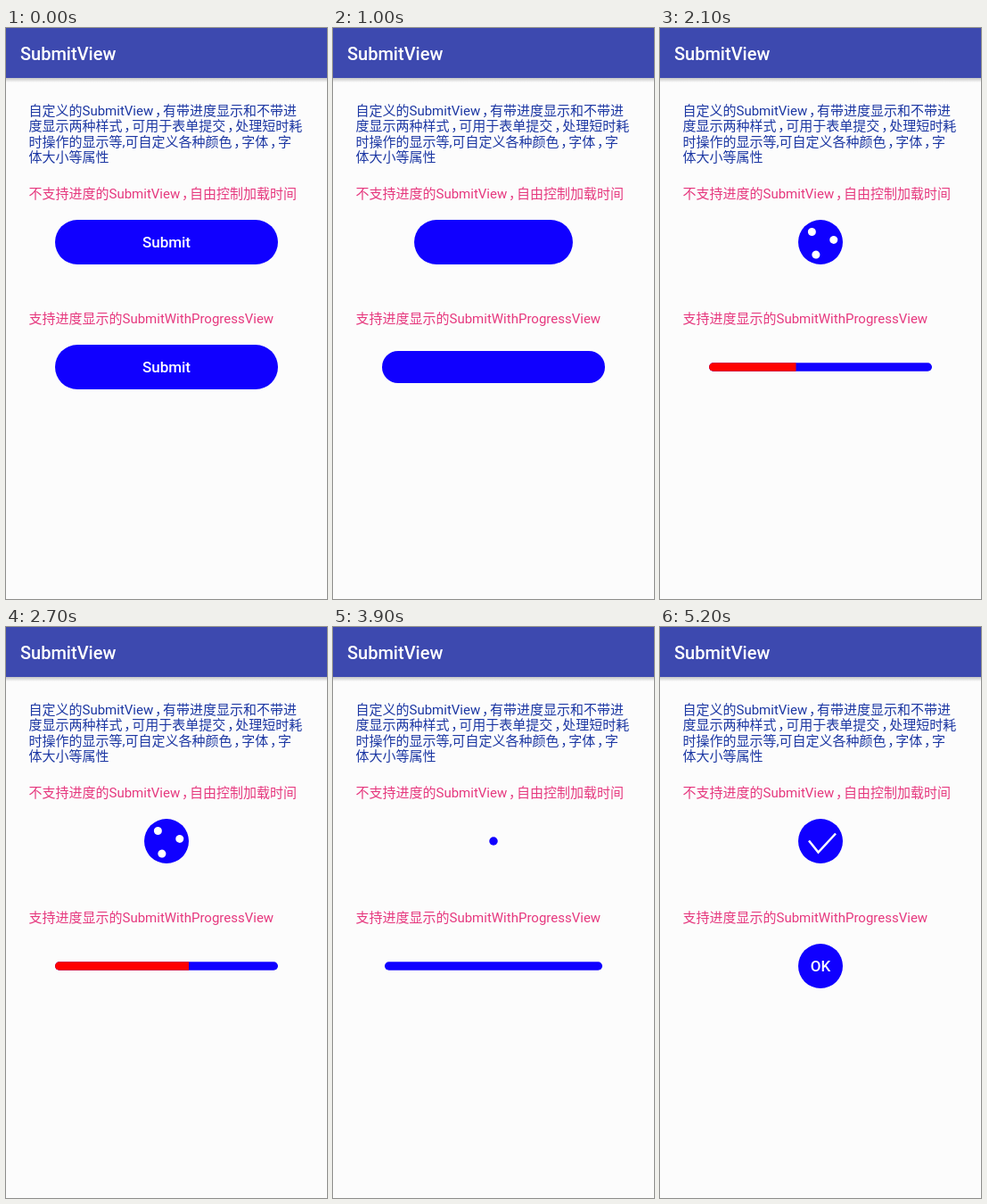
An HTML page that plays this animation: 360 by 640 pixels, repeating every 5.3 s.

```html
<!DOCTYPE html>
<html lang="zh-CN">
<head>
<meta charset="utf-8">
<title>SubmitView</title>
<style>
html, body { margin: 0; width: 100%; height: 100%; overflow: hidden; background: #fcfcfc; }
svg { display: block; width: 100%; height: 100%; }
text { font-family: Roboto, "Noto Sans CJK SC", "Noto Sans CJK", sans-serif; font-size: 15px; }
.title { font-size: 20px; font-weight: 500; fill: #fff; }
.label { font-size: 17px; font-weight: 500; fill: #fff; text-anchor: middle; }
.intro { fill: #1c37a3; }
.note { fill: #e6387e; }
.fill { fill: #1000ff; }
</style>
</head>
<body>
<svg viewBox="0 0 360 640">
  <defs>
    <linearGradient id="shade" x1="0" y1="0" x2="0" y2="1">
      <stop offset="0" stop-color="#000" stop-opacity=".22"/>
      <stop offset="1" stop-color="#000" stop-opacity="0"/>
    </linearGradient>
    <clipPath id="barClip"><rect id="clipRect"/></clipPath>
  </defs>
  <rect width="360" height="640" fill="#fcfcfc"/>
  <rect width="360" height="56" fill="#3d49af"/>
  <rect y="56" width="360" height="5" fill="url(#shade)"/>
  <text class="title" x="16" y="36">SubmitView</text>
  <g id="copy"></g>

  <rect id="top" class="fill"/>
  <text id="topLabel" class="label" x="180" y="246">Submit</text>
  <g id="dots" fill="#fff">
    <circle cx="15" r="4.5"/>
    <circle cx="15" r="4.5" transform="rotate(120)"/>
    <circle cx="15" r="4.5" transform="rotate(240)"/>
  </g>
  <path id="tick" d="M167 239.5L177.500 252.500L197 231.500" fill="none" stroke="#fff" stroke-width="2.5"/>

  <rect id="bar" class="fill"/>
  <rect id="done" x="55" y="355" height="50" fill="#f00" clip-path="url(#barClip)"/>
  <text id="barLabel" class="label" x="180" y="386">Submit</text>
</svg>
<script>
const NS = 'http://www.w3.org/2000/svg';
const LOOP = 5300, STEP = 100;
const WIDE = 250, TALL = 50, THIN = 9.5;
const $ = id => document.getElementById(id);

// Full-width commas sit in a narrower cell than the other glyphs.
function addLine(cls, y, str) {
  const line = document.createElementNS(NS, 'text');
  line.setAttribute('class', cls);
  line.setAttribute('x', 25.5);
  line.setAttribute('y', y);
  const span = (s, dx) => {
    const el = document.createElementNS(NS, 'tspan');
    el.textContent = s;
    el.setAttribute('dx', dx);
    line.append(el);
  };
  str.split('，').forEach((part, i) => {
    if (i) span('，', 1.8);
    span(part, i ? -6 : 0);
  });
  $('copy').append(line);
}

addLine('intro', 97.5, '自定义的SubmitView，有带进度显示和不带进');
addLine('intro', 115, '度显示两种样式，可用于表单提交，处理短时耗');
addLine('intro', 132.5, '时操作的显示等,可自定义各种颜色，字体，字');
addLine('intro', 150, '体大小等属性');
addLine('note', 190.5, '不支持进度的SubmitView，自由控制加载时间');
addLine('note', 330.5, '支持进度显示的SubmitWithProgressView');

const clamp = x => Math.min(1, Math.max(0, x));

// Eased 0..1 between two times
const ramp = (t, from, to) => (1 - Math.cos(Math.PI * clamp((t - from) / (to - from)))) / 2;

function pill(el, cy, w, h) {
  const box = { x: 180 - w / 2, y: cy - h / 2, width: w, height: h, rx: Math.min(w, h) / 2 };
  for (const key in box) el.setAttribute(key, box[key]);
}

const show = (el, on) => el.setAttribute('visibility', on ? 'visible' : 'hidden');

function drawTop(t) {
  const pulse = (TALL - THIN) * (ramp(t, 3300, 3800) - ramp(t, 3900, 4300));
  const w = WIDE - (WIDE - TALL) * ramp(t, 795, 1295);
  pill($('top'), 240, w - pulse, TALL - pulse);
  show($('topLabel'), t < 800);
  show($('dots'), t >= 1300 && t < 3300);
  $('dots').setAttribute('transform', `translate(180 240) rotate(${270 + (t - 1300) * 0.4})`);
  show($('tick'), t >= 4300);
}

function drawBar(t) {
  const grow = (TALL - THIN) * ramp(t, 4500, 4900);
  const w = WIDE - (WIDE - THIN) * ramp(t, 3850, 4350) + grow;
  const h = TALL - (TALL - THIN) * ramp(t, 800, 1300) + grow;
  pill($('bar'), 380, w, h);
  pill($('clipRect'), 380, w, h);
  $('done').setAttribute('width', WIDE * clamp(0.18 + (t - 1500) * 0.00035));
  show($('done'), t >= 1300 && t < 3850);
  $('barLabel').textContent = t < 800 ? 'Submit' : 'OK';
  show($('barLabel'), t < 800 || t >= 4900);
}

function draw(ms) {
  const t = Math.floor((ms % LOOP) / STEP) * STEP;
  drawTop(t);
  drawBar(t);
}

const start = performance.now();
function tick() {
  draw(performance.now() - start);
  requestAnimationFrame(tick);
}
tick();
</script>
</body>
</html>
```
